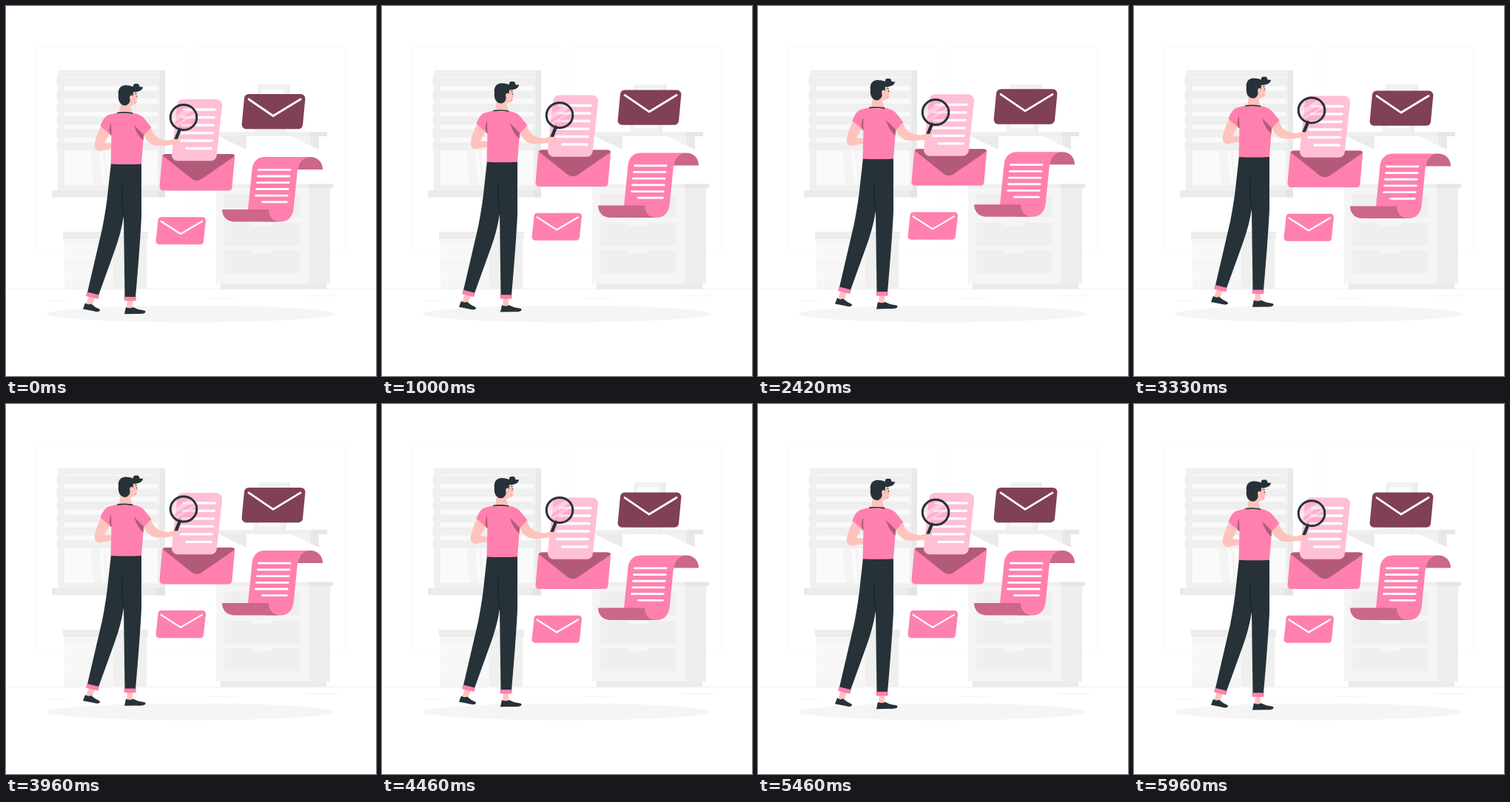
An HTML page with a canvas that plays this animation: 500x500 px, repeating every 6000 ms.

```html
<!DOCTYPE html>
<html lang="en">
<head>
<meta charset="utf-8">
<title>Reading mail</title>
<style>
html, body { margin: 0; width: 100%; height: 100%; overflow: hidden; background: #fff; }
canvas { display: block; width: 500px; height: 500px; }
</style>
</head>
<body>
<canvas id="stage"></canvas>
<script>
const canvas = document.getElementById('stage');
const ctx = canvas.getContext('2d');
const scale = window.devicePixelRatio || 1;
canvas.width = canvas.height = 500 * scale;

const LOOP = 6000, FPS = 24, RISE = 10;
const PINK = '#ff80ae', PALE = '#ffbfd7', ROSE = '#cc668b', PLUM = '#b35a7a', WINE = '#804057';
const DARK = '#263238', SKIN = '#ffc3bd';

function fill(d, color) {
  ctx.fillStyle = color;
  ctx.fill(new Path2D(d));
}

function line(d, color, width) {
  ctx.strokeStyle = color;
  ctx.lineWidth = width;
  ctx.lineCap = ctx.lineJoin = 'round';
  ctx.stroke(new Path2D(d));
}

function rect(x, y, x2, y2, color) {
  ctx.fillStyle = color;
  ctx.fillRect(x, y, x2 - x, y2 - y);
}

// Slanted card with rounded corners
function card(left, right, top, bottom, slant, r, color) {
  const pts = [[left + slant, top], [right, top], [right - slant, bottom], [left, bottom]];
  ctx.beginPath();
  ctx.moveTo((left + slant + right) / 2, top);
  for (let i = 1; i <= 4; i++) {
    const a = pts[i % 4], b = pts[(i + 1) % 4];
    ctx.arcTo(a[0], a[1], b[0], b[1], r);
  }
  ctx.closePath();
  ctx.fillStyle = color;
  ctx.fill();
}

// Lines of writing, each starting a bit further left
function writing(x, x2, y, gap, indent, width) {
  for (let i = 0; i < 6; i++) {
    const start = x - i + (i === 5 ? indent : 0);
    line(`M${start} ${y + i * gap}H${x2 - i * 0.95}`, '#fff', width);
  }
}

function drawRoom() {
  ctx.strokeStyle = '#f9f9f9';
  ctx.lineWidth = 1;
  for (const x of [39.5, 255.5]) {
    ctx.beginPath();
    ctx.roundRect(x, 55.5, 203, 282, 3);
    ctx.stroke();
  }

  // Window
  rect(70, 87, 215, 249, '#f0f0f0');
  rect(208, 87, 215, 249, '#e9e9e9');
  rect(79, 96, 205, 242, '#fafafa');
  fill('M114 195H126L130 242H118ZM131 195H134L138 242H135Z', '#f4f4f4');
  for (let i = 0; i < 6; i++) {
    rect(68.5, 97 + i * 17.4, 208, 108 + i * 17.4, '#efefef');
  }
  rect(62, 249, 215, 258.5, '#ebebeb');
  rect(204, 249, 215, 258.5, '#e4e4e4');

  // Low chest
  rect(79, 312, 190, 382, '#f0f0f0');
  rect(79, 314, 145, 382, '#f5f5f5');
  rect(79, 323, 145, 345, '#f8f8f8');
  rect(79, 350, 145, 372, '#f8f8f8');
  rect(77, 305, 192, 314, '#ededed');
  rect(77, 312.5, 192, 314, '#e6e6e6');

  // Tall chest
  rect(284, 245, 438, 375, '#f5f5f5');
  rect(409, 245, 438, 375, '#eeeeee');
  rect(290, 375, 433, 382.5, '#ebebeb');
  for (const y of [254, 293, 330]) {
    rect(295, y, 398, y + 31, '#efefef');
    fill(`M331 ${y - 1}H361L358 ${y + 4}H334Z`, '#f6f6f6');
  }
  rect(283, 240.5, 442, 246, '#efefef');
  rect(409, 240.5, 442, 246, '#e5e5e5');

  // Shelf
  fill('M342 106H384L378 170H335Z', '#ebebeb');
  fill('M341 106H381L375 170H335Z', '#f1f1f1');
  fill('M345 112H376L371 165H340Z', '#fafafa');
  fill('M288 176L325 194V176Z', '#ebebeb');
  fill('M386 176L423 194V176Z', '#e9e9e9');
  fill('M386 176L411 188V176Z', '#f3f3f3');
  rect(285, 170, 434, 176, '#efefef');
  rect(411, 170, 434, 176, '#e6e6e6');

  // Floor
  rect(0, 382, 500, 382.7, '#ebebeb');
  for (const [a, b, y] of [[56, 82, 398], [272, 312, 395], [405, 448, 391]]) {
    rect(a, y, b, y + 0.7, '#f0f0f0');
  }
  ctx.beginPath();
  ctx.ellipse(249.5, 416, 194, 11.3, 0, 0, Math.PI * 2);
  ctx.fillStyle = '#f5f5f5';
  ctx.fill();
}

function drawMail() {
  card(318, 405, 119, 166.3, 4.5, 6, WINE);
  line('M328 126L361 148.5L398 126', '#fff', 2.8);

  card(202, 270.5, 285.2, 322.3, 4, 4.5, PINK);
  line('M209.5 291L236 308L265 291', '#fff', 2.2);

  // Open envelope with letter
  card(207, 309.5, 200, 249.5, 4.5, 5, PINK);
  fill('M211.5 202Q213 200 216 200H305Q309 200 309 203L264 234Q257 238 251 233.5Z', PLUM);
  card(223, 293, 126, 209.3, 9, 8, PALE);
  writing(240, 282, 140, 10.5, 9, 3.4);

  // Scroll
  fill('M350 204H412C402 204 395 211 394 221L388.5 275C387 285 381 291.5 371 291.5H350L327 275L332.5 221C333.5 210 340 204 350 204Z', PINK);
  fill('M411 204C421 204 428 211 428 221H394C395 211 402 204 411 204Z', ROSE);
  fill('M292 275H355C355 285 361 291.5 371 291.5H309C299 291.5 292 285 292 275Z', ROSE);
  writing(341.5, 384, 221.3, 8.7, 10, 2.8);
}

function drawLens() {
  line('M235 166.5L229.5 180', DARK, 4.4);
  ctx.save();
  ctx.beginPath();
  ctx.ellipse(240, 150.5, 17.8, 17, 0, 0, Math.PI * 2);
  ctx.fillStyle = 'rgba(255,128,174,.3)';
  ctx.fill();
  ctx.clip();
  fill('M222 153L252 134L258 138L224 159Z', 'rgba(255,255,255,.38)');
  fill('M226 162L258 143V146L228 164Z', 'rgba(255,255,255,.38)');
  ctx.restore();
  ctx.beginPath();
  ctx.ellipse(240, 150.5, 17.8, 17, 0, 0, Math.PI * 2);
  ctx.strokeStyle = DARK;
  ctx.lineWidth = 3;
  ctx.stroke();
}

function drawMan() {
  // Feet
  fill('M112 392L120 394L116 405L108 403Z', SKIN);
  fill('M164 397H171L171 409H163Z', SKIN);
  fill('M107 401.5Q111 404.5 115 402.5Q120 407 126 409.5Q128 411 126 412.5Q123 414 117 412L104 409.5Z', DARK);
  fill('M162 407Q167 409.5 172 407Q178 410.5 187 411.5Q189.5 412.5 188 414.5Q185 416.5 176 416L160 416.3Z', DARK);

  // Trousers
  fill('M142 212H183L183 285Q181 325 175 394H160.5L159 284Q156 305 147 330L125 391L110 387L130 301Q136 270 138 248Z', DARK);
  line('M157.5 242Q155 258 159 284', '#161f24', 0.8);
  fill('M109.5 386.5L126 390.5L124.3 396L108 392Z', PINK);
  fill('M159.3 393H176L175.3 398.6H160Z', PINK);

  // Arms
  fill('M129 161Q121 177 119.5 188Q120 195 126 196L143 193V186L133 185L141 171Z', SKIN);
  fill('M185 174L196 165Q199 174 205 178Q213 181.5 220 181.5Q226 179 231 180Q236 181 234 184.5Q230 188 220 188Q207 190 199 188Q192 185 185 174Z', SKIN);

  // Shirt
  fill('M151 144L171 144.5Q181 146 186 151L196.5 164L186 175L183 213.5Q162 214.5 141.5 213.5L142.5 175L127.5 162Q132 149 139 147Z', PINK);
  fill('M173 161L186 174L185.5 182Q177 175 173 161Z', PLUM);
  fill('M142 157Q138 168 141 174L142.5 175Z', PLUM);

  // Head
  fill('M155 131L168 113Q176 114 177 119L178.3 125L176.7 127Q177 133 172 133.5L168 135.5L171 145Q162 147 153 144Z', SKIN);
  line('M151 144.3Q160 143.2 170.5 144.8', DARK, 1.6);
  fill('M152.5 113Q154 108 161 107Q167 107 172 109Q171 104.9 176 104.9Q181 105 180 108.5Q183 110 185 109Q185 113 180 115Q175 117 172 116L171.5 122Q167 119.5 167.5 125Q168.5 131 163 134Q158 135.5 154 131Q151 126 152 119Q151 117 152.5 113Z', DARK);
  ctx.beginPath();
  ctx.ellipse(169.5, 123.5, 2.2, 3, 0, 0, Math.PI * 2);
  ctx.fillStyle = SKIN;
  ctx.fill();
  line('M176.3 121.5V122.3', DARK, 1.1);
  line('M174.3 118.4L176.6 118.2', DARK, 0.7);
  line('M174.8 130.3L176.4 129.8', '#e5758f', 0.7);

  drawLens();
  line('M225 182.5Q229 180.5 234 182.5', SKIN, 3.6);
}

// Linear rise and fall
function lift(t, period) {
  const p = (t / period) % 1;
  return RISE * (1 - Math.abs(2 * p - 1));
}

function at(y, draw) {
  ctx.save();
  ctx.translate(0, y);
  draw();
  ctx.restore();
}

function render(now) {
  const frame = Math.floor(((now + 5) % LOOP) * FPS / 1000);
  const t = (frame + 1) * 1000 / FPS;
  ctx.setTransform(scale, 0, 0, scale, 0, 0);
  rect(0, 0, 500, 500, '#fff');
  drawRoom();
  at(0.55 - lift(t, 1500), drawMail);
  at(0.12 - lift(t, 7000), drawMan);
}

function tick() {
  render(performance.now());
  requestAnimationFrame(tick);
}
tick();
</script>
</body>
</html>
```
